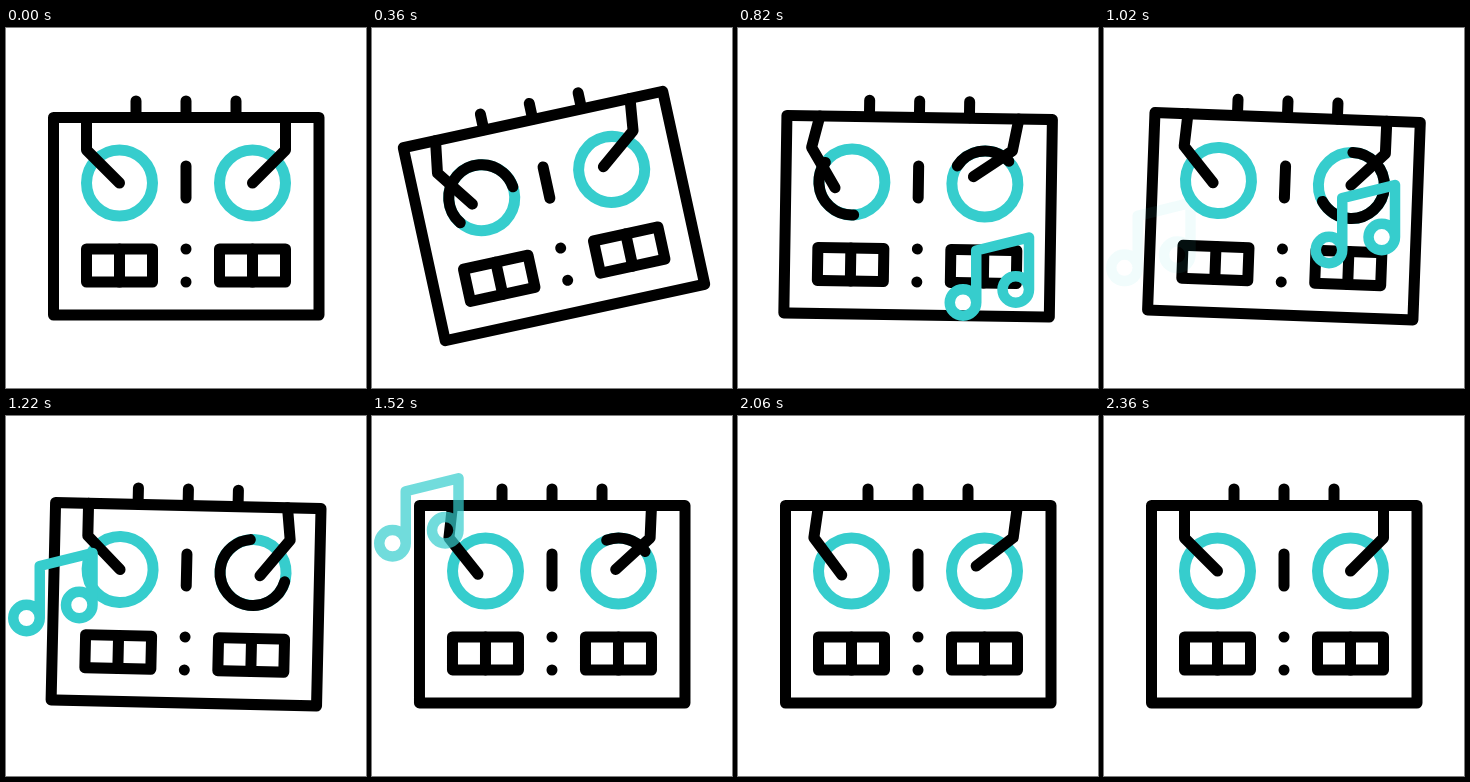
Recreate the animation shown at these times as an HTML page with a canvas. Size 360 by 360 pixels, loop 2.4 s.

```html
<!DOCTYPE html>
<html lang="en">
<head>
<meta charset="utf-8">
<title>DJ deck</title>
<style>
  html, body { margin: 0; width: 100%; height: 100%; overflow: hidden; background: #fff; }
  canvas { display: block; width: 360px; height: 360px; }
</style>
</head>
<body>
<canvas id="stage" width="360" height="360"></canvas>
<script>
const ctx = document.getElementById('stage').getContext('2d');
const LOOP = 2400, BLACK = '#000', TEAL = '#36cdcd';
const RAD = Math.PI / 180;

// Keyframes are [time, degrees], eased in and out.
const TILT = [[0, 0], [200, -14], [960, 2.2], [1550, 0]];
const LEFT_ARM = [[0, 0], [690, 16.5], [1200, 0], [1850, 13], [2360, 0]];
const RIGHT_ARM = [[0, 0], [700, 13], [1230, -6], [1840, 12.3], [2360, 0]];

const clamp = u => Math.min(1, Math.max(0, u));
const progress = (t, start, length) => clamp((t - start) / length);
const ease = u => (1 - Math.cos(Math.PI * u)) / 2;

function keyed(keys, t) {
  const i = keys.findIndex(k => k[0] > t);
  if (i < 0) return keys[keys.length - 1][1];
  const [t0, a] = keys[i - 1], [t1, b] = keys[i];
  return a + (b - a) * ease((t - t0) / (t1 - t0));
}

function stroke(color, ...lines) {
  ctx.strokeStyle = color;
  ctx.beginPath();
  for (const points of lines) {
    points.forEach(([x, y], i) => i ? ctx.lineTo(x, y) : ctx.moveTo(x, y));
  }
  ctx.stroke();
}

function box(x, y, w, h) {
  ctx.strokeStyle = BLACK;
  ctx.strokeRect(x, y, w, h);
}

function arc(color, x, y, from, to) {
  ctx.strokeStyle = color;
  ctx.beginPath();
  ctx.arc(x, y, 33, from * RAD, to * RAD);
  ctx.stroke();
}

// A black arc whose head runs ahead and whose tail catches up.
function disc(x, t, start, length, angle) {
  arc(TEAL, x, 155, 0, 360);
  const u = progress(t, start, length);
  if (u <= 0 || u >= 1) return;
  const tail = angle + 480 * u ** 1.8;
  const head = angle + 480 * (1 - (1 - u) ** 2.5);
  arc(BLACK, x, 155, tail, head);
}

function arm(x, side, degrees) {
  ctx.save();
  ctx.translate(x, 89.5);
  ctx.rotate(degrees * RAD);
  stroke(BLACK, [[0, 0], [0, 32.5], [33 * side, 65.5]]);
  ctx.restore();
}

function deck(t) {
  ctx.save();
  ctx.translate(180, 180);
  ctx.rotate(keyed(TILT, t) * RAD);
  ctx.translate(-180, -180);
  ctx.lineWidth = 11;

  disc(113.5, t, 155, 800, 101);
  disc(246.5, t, 735, 865, 205);

  box(47.5, 89.5, 265.5, 197.5);
  for (const x of [130, 180, 230]) stroke(BLACK, [[x, 73], [x, 89]]);
  stroke(BLACK, [[180, 138], [180, 170]]);
  for (const x of [80.5, 213.5]) {
    box(x, 221, 66, 33);
    stroke(BLACK, [[x + 33, 221], [x + 33, 254]]);
  }
  for (const y of [221, 254]) stroke(BLACK, [[180, y], [180, y + 0.01]]);

  arm(80.5, 1, keyed(LEFT_ARM, t));
  arm(279.5, -1, keyed(RIGHT_ARM, t));
  ctx.restore();
}

// A pair of quavers that rises while fading in and out.
function note(x, y, t, start) {
  const u = progress(t, start, 620);
  if (u <= 0 || u >= 1) return;
  ctx.save();
  ctx.globalAlpha = clamp(Math.min(u, 1 - u) / 0.25);
  ctx.translate(x, y - 130 * (u + ease(u)) / 2);
  ctx.lineWidth = 10.5;
  ctx.strokeStyle = TEAL;
  ctx.beginPath();
  ctx.arc(0, 0, 13.25, 0, 2 * Math.PI);
  ctx.lineTo(13.25, -52);
  ctx.lineTo(66, -65);
  ctx.lineTo(66, -13);
  ctx.arc(52.75, -13, 13.25, 0, 2 * Math.PI);
  ctx.stroke();
  ctx.restore();
}

function draw(now) {
  const t = now % LOOP;
  ctx.fillStyle = '#fff';
  ctx.fillRect(0, 0, 360, 360);
  ctx.lineCap = ctx.lineJoin = 'round';
  deck(t);
  note(225, 316, t, 600);
  note(20.5, 241, t, 1010);
  requestAnimationFrame(draw);
}

const begin = performance.now();
draw(0);
function draw0() {}
</script>
</body>
</html>
```
